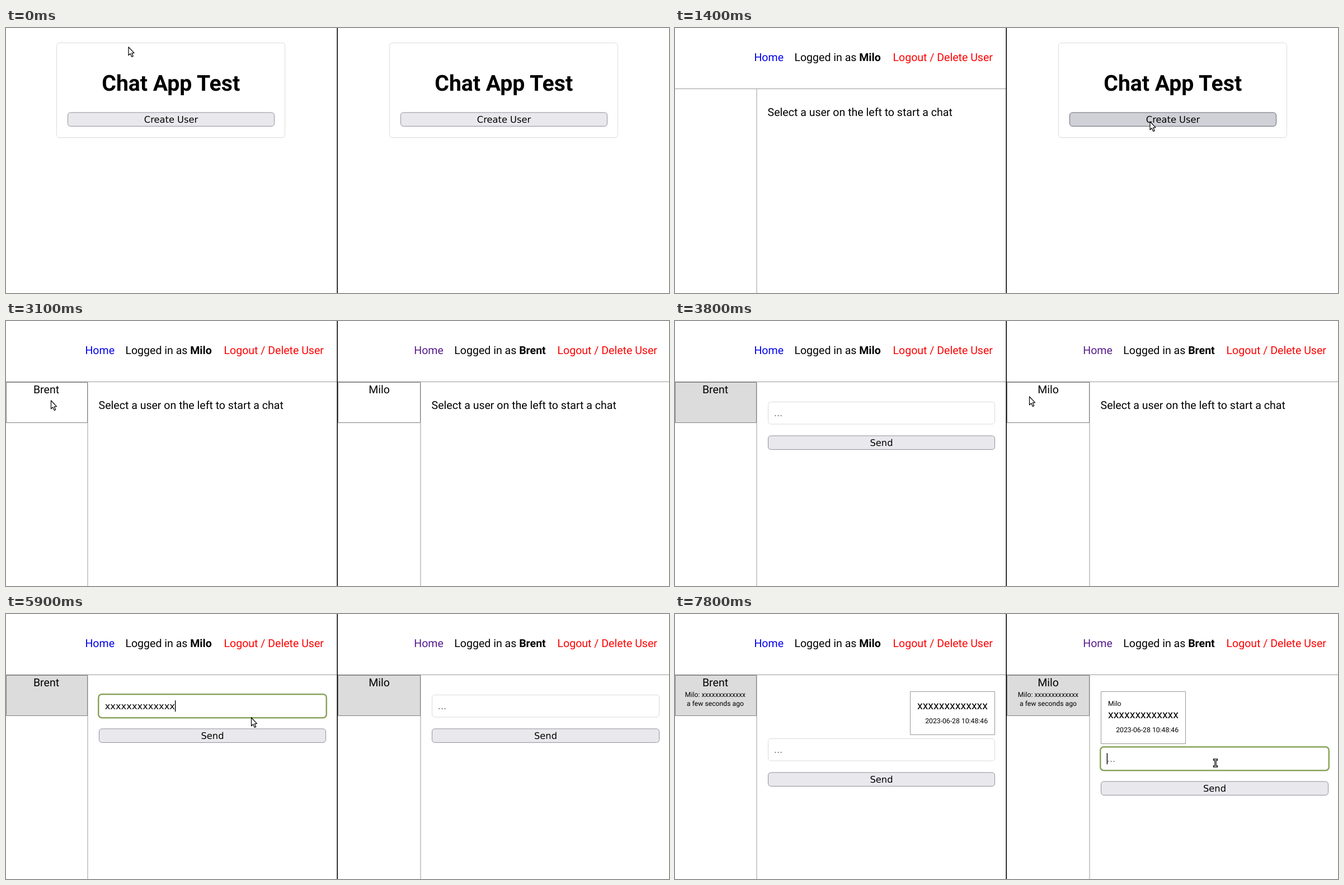
These frames come from a looping animation (1185x473 px, 8000 ms). An HTML page with a canvas:

```html
<!DOCTYPE html>
<html lang="en">
<head>
<meta charset="utf-8">
<title>Chat app demo</title>
<style>
  html, body { margin: 0; width: 100%; height: 100%; overflow: hidden; background: #fff; }
  canvas { display: block; width: 1185px; height: 473px; }
</style>
</head>
<body>
<canvas id="stage"></canvas>
<script>
const W = 1185, H = 473, LOOP = 8000, STEP = 100;
const canvas = document.getElementById('stage');
const ctx = canvas.getContext('2d');
const dpr = window.devicePixelRatio || 1;
canvas.width = W * dpr;
canvas.height = H * dpr;
ctx.textRendering = 'geometricPrecision';

const UI = '16.3px "DejaVu Sans", sans-serif';
const roboto = (size, weight = 400) => `${weight} ${size}px Roboto, sans-serif`;
const BODY = roboto(19.56), SMALL = roboto(12.23);
const MESSAGE = 'x'.repeat(13);
const SENDER = 'Milo';

// Moments at which the interface changes, in ms
const AT = { typing: 5200, typed: 5800, clickSend: 6200, sent: 6600 };

const panes = [
  { x: 0, dx: 0, wide: 406, me: 'Milo', other: 'Brent', nav: [141.4, 213.4, 389.5],
    home: '#0000ee', login: 800, select: 3500, focus: 4600, blur: AT.clickSend, mine: true },
  { x: 593, dx: 595, wide: 407, me: 'Brent', other: 'Milo', nav: [729.2, 801.3, 985.5],
    home: '#551a8b', login: 1800, select: 4000, focus: 7600, blur: LOOP, mine: false }
];

// Pointer path: time, x, y
const path = [
  [0, 219, 34], [500, 232, 163], [700, 232, 163], [1200, 1119, 130], [1400, 849, 167],
  [1700, 849, 167], [2600, 297, 207], [3100, 80.5, 142], [3300, 86, 127], [3400, 86, 127],
  [3800, 633.5, 135], [4000, 645, 138], [4300, 560, 160], [4700, 437, 154], [5800, 437, 154],
  [6000, 440, 216], [6200, 440, 216], [6500, 569, 204], [6800, 850, 185], [7000, 850, 185],
  [7500, 960, 282], [7800, 966, 266]
];

function pointerAt(t) {
  const i = path.findIndex(p => p[0] > t);
  if (i < 0) return path[path.length - 1].slice(1);
  const [t0, x0, y0] = path[i - 1], [t1, x1, y1] = path[i];
  const u = (t - t0) / (t1 - t0), k = u * u * (3 - 2 * u);
  return [x0 + (x1 - x0) * k, y0 + (y1 - y0) * k];
}

const inside = ([px, py], x, y, w, h) => px >= x && px <= x + w && py >= y && py <= y + h;

function text(str, x, y, font, color = '#000', align = 'left') {
  ctx.font = font;
  ctx.fillStyle = color;
  ctx.textAlign = align;
  ctx.fillText(str, x, y);
}

function box(x, y, w, h, r, fill, stroke, line = 1) {
  ctx.beginPath();
  ctx.roundRect(x + line / 2, y + line / 2, w - line, h - line, r);
  ctx.fillStyle = fill;
  ctx.fill();
  ctx.strokeStyle = stroke;
  ctx.lineWidth = line;
  ctx.stroke();
}

function rect(x, y, w, h, color) {
  ctx.fillStyle = color;
  ctx.fillRect(x, y, w, h);
}

function button(label, x, y, w, mouse, active) {
  const hover = inside(mouse, x, y, w, 26);
  const fill = hover ? (active ? '#b1b1b9' : '#d0d0d7') : '#e9e9ed';
  box(x, y + 0.4, w, 25.5, 5, fill, hover ? '#676774' : '#8f8f9d');
  text(label, x + w / 2, y + 19, UI, '#000', 'center');
}

function drawWelcome(p, mouse) {
  const x = p.dx + 90;
  rect(x + 3, 195.5, 403, 1, '#f1f1f1');
  box(x, 26, 409, 170, 5, '#fff', '#dcdcdc');
  text('Chat App Test', x + 204.7, 112, roboto(39.2, 700), '#000', 'center');
  button('Create User', x + 20, 150, 370, mouse);
}

function drawNav(p) {
  const [home, user, logout] = p.nav, intro = 'Logged in as ';
  text('Home', home, 59, BODY, p.home);
  text(intro, user, 59, BODY);
  text(p.me, user + ctx.measureText(intro).width, 59, roboto(19.56, 700));
  text('Logout / Delete User', logout, 59, BODY, '#f00');
}

function drawContact(p, t) {
  const edge = p.dx + 146, mid = p.dx + 72;
  box(p.x, 109, edge - p.x, 73, 0, t >= p.select ? '#dcdcdc' : '#fff', '#808080');
  text(p.other, mid, 129, BODY, '#000', 'center');
  if (t >= AT.sent) {
    text(`${SENDER}: ${MESSAGE}`, mid, 147.5, SMALL, '#000', 'center');
    text('a few seconds ago', mid, 163.5, SMALL, '#000', 'center');
  }
}

function drawMessage(p) {
  const x = p.mine ? 420 : 761, extra = p.mine ? 0 : 16;
  box(x, 138, 152, 78 + extra, 0, '#fff', '#999');
  if (!p.mine) text(SENDER, x + 13, 163.5, SMALL);
  text(MESSAGE, x + 139, 170 + extra, BODY, '#000', 'right');
  text('2023-06-28 10:48:46', x + 139, 194.5 + extra, SMALL, '#000', 'right');
}

function drawChat(p, t, mouse) {
  const x = p.dx + 166, sent = t >= AT.sent;
  const y = sent ? (p.mine ? 222 : 238) : 144;
  if (sent) drawMessage(p);

  let draft = '';
  if (p.mine && !sent && t >= AT.typing) {
    const part = (t - AT.typing + STEP) / (AT.typed - AT.typing + STEP);
    draft = MESSAGE.slice(0, Math.round(MESSAGE.length * Math.min(1, part)));
  }
  const focused = t >= p.focus && t < p.blur;
  if (focused) box(x - 2, y - 2, p.wide + 4, 44.5, 6, '#fff', '#8aa45c', 2.5);
  else box(x, y, p.wide, 40.5, 5, '#fff', '#dadada');
  text(draft || '...', x + 10.7, y + 26, UI, draft ? '#000' : '#757575');
  if (focused) {
    const end = draft ? ctx.measureText(draft).width : 0;
    rect(x + 10.7 + end, y + 10.3, 1.4, 20, '#000');
  }
  button('Send', x, y + 60, p.wide, mouse, t === AT.clickSend);
  return inside(mouse, x, y, p.wide, 40);
}

// Returns true while the pointer is over a text field
function drawPane(p, t, mouse) {
  if (t < p.login) {
    drawWelcome(p, mouse);
    return false;
  }
  drawNav(p);
  rect(p.x, 108, 592, 1, '#999');
  rect(p.dx + 145.5, 109, 1, H, '#999');
  if (t >= panes[1].login) drawContact(p, t);
  if (t >= p.select) return drawChat(p, t, mouse);
  text('Select a user on the left to start a chat', p.dx + 165.6, 157, BODY);
  return false;
}

function trace(points) {
  ctx.beginPath();
  points.forEach(([x, y]) => ctx.lineTo(x, y));
  ctx.closePath();
}

function drawPointer([x, y], beam) {
  ctx.save();
  ctx.translate(x, y);
  ctx.lineJoin = 'round';
  if (beam) {
    for (const [color, line] of [['#000', 3.4], ['#fff', 1]]) {
      ctx.beginPath();
      ctx.moveTo(-2.5, -6); ctx.lineTo(2.5, -6);
      ctx.moveTo(0, -6); ctx.lineTo(0, 6);
      ctx.moveTo(-2.5, 6); ctx.lineTo(2.5, 6);
      ctx.strokeStyle = color;
      ctx.lineWidth = line;
      ctx.lineCap = 'square';
      ctx.stroke();
    }
  } else {
    trace([[0, 0], [0, 14.8], [3.3, 11.8], [5.8, 17.5], [8.2, 16.4], [5.8, 10.8], [10, 10.6]]);
    ctx.fillStyle = '#fff';
    ctx.fill();
    ctx.strokeStyle = '#000';
    ctx.lineWidth = 1.2;
    ctx.stroke();
  }
  ctx.restore();
}

function draw(t) {
  const mouse = pointerAt(t);
  ctx.setTransform(dpr, 0, 0, dpr, 0, 0);
  rect(0, 0, W, H, '#fff');
  const beam = panes.map(p => drawPane(p, t, mouse)).some(Boolean);
  rect(591.4, 0, 1.6, H, '#000');
  drawPointer(mouse, beam);
}

const start = performance.now();
function tick() {
  const t = (performance.now() - start) % LOOP;
  draw(Math.floor(t / STEP) * STEP);
  requestAnimationFrame(tick);
}
tick();
</script>
</body>
</html>
```
